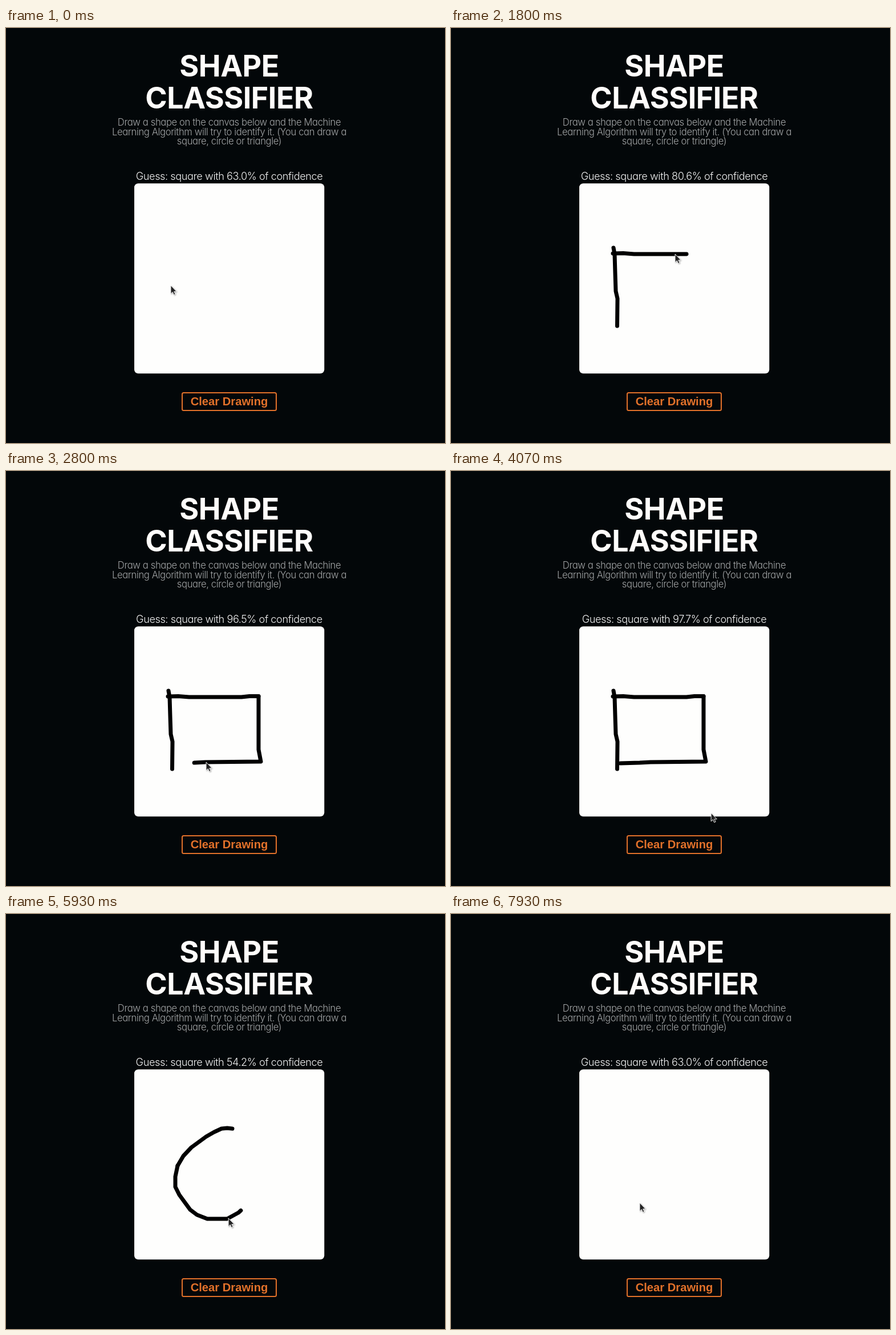
An HTML page that plays this animation: 770x727 px, repeating every 8000 ms.

```html
<!DOCTYPE html>
<html lang="en">
<head>
<meta charset="utf-8">
<title>Shape Classifier</title>
<style>
  html, body { margin: 0; width: 100%; height: 100%; overflow: hidden; background: #030709; }
  svg { display: block; }
  text { text-anchor: middle; font-family: Inter, sans-serif; font-weight: 300; letter-spacing: -.025em;
         font-optical-sizing: none; font-feature-settings: "cv11"; }
  .title { font-size: 52px; font-weight: 700; letter-spacing: -.01em; fill: #fffdfb; }
  .intro { font-size: 16.7px; fill: #a4a6a7; }
  #guess { font-size: 18.2px; fill: #f4f4f4; }
  .button { font: 700 20.2px "Liberation Sans", Arial, sans-serif; letter-spacing: 0; fill: #e2712a; }
  #ink path { fill: none; stroke: #000; stroke-width: 7; stroke-linecap: round; stroke-linejoin: round; }
  #cursor { fill: #222; stroke: #fff; stroke-width: .9; filter: drop-shadow(1px 1px 1px rgba(0, 0, 0, .35)); }
</style>
</head>
<body>
<svg width="770" height="727" viewBox="0 0 770 727">
  <text class="title" x="391.5" y="84.5">SHAPE</text>
  <text class="title" x="391.5" y="141">CLASSIFIER</text>
  <text class="intro" x="391.5" y="171">Draw a shape on the canvas below and the Machine</text>
  <text class="intro" x="391.5" y="187.6">Learning Algorithm will try to identify it. (You can draw a</text>
  <text class="intro" x="391.5" y="204.2">square, circle or triangle)</text>
  <text id="guess" x="391.5" y="266"></text>
  <rect x="225" y="272.3" width="333.3" height="333" rx="7" fill="#fefefd"/>
  <rect x="309" y="639" width="165" height="31" rx="2.5" fill="none" stroke="#e2712a" stroke-width="2"/>
  <text class="button" x="391.5" y="661">Clear Drawing</text>
  <g id="ink"></g>
  <path id="cursor" d="M0 0V14.6L3.3 11.5 5.5 16.5 8 15.4 5.8 10.7H10.2Z"/>
</svg>
<script>
const LOOP = 8000, STEP = 1000 / 15;
const [ink, cursor, guess] = ['ink', 'cursor', 'guess'].map(id => document.getElementById(id));

// Pointer travel: start, end, path, and for pen strokes the time they are cleared
const moves = [
  [0, 267, 'M289 451L287 413'],
  [340, 530, 'M287 413L285 385'],
  [530, 1070, 'M285 385L287 396 288 430 289 461 292 474 291.5 522', 4600],
  [1190, 1370, 'M291.5 522L284 395'],
  [1370, 1900, 'M284 395L302 394.5 321 396 413 396 427 394.5 443 394.5', 4600],
  [2060, 2906, 'M443 394.5V488L447 509 350 510 331 511 297 512', 4600],
  [2930, 3060, 'M297 512L293 510'],
  [3330, 3860, 'M293 510L286 507Q510 540 480 580Q472 594 456 599'],
  [3990, 4060, 'M456 599L457 600'],
  [4130, 4330, 'M457 600Q410 655 383 645'],
  [4600, 5000, 'M383 645L397 376'],
  [5267, 5400, 'M397 376L388 375 378 376 365 382 351 390 325 409 311 424 301 441', 7460],
  [5460, 6400, 'M301 441L297 460V478L304 492 323 518 335 527 353 534H388L408 523 423 509' +
    ' 433 491V436L426 412 409 386 396 375 390 372 381 369', 7460],
  [6400, 6465, 'M381 369L372 374'],
  [6470, 6935, 'M372 374L439 577'],
  [7000, 7065, 'M439 577L448 628'],
  [7190, 7400, 'M448 628L440 651'],
  [7500, 7860, 'M440 651L331 506'],
].map(([start, end, d, cleared]) => {
  const path = document.createElementNS('http://www.w3.org/2000/svg', 'path');
  path.setAttribute('d', d);
  if (cleared) ink.append(path);
  return { start, end, path, cleared, length: path.getTotalLength() };
});

const guesses = [
  [0, 'square', '63.0'], [660, 'square', '60.8'], [860, 'square', '64.7'], [1060, 'square', '68.2'],
  [1530, 'square', '76.4'], [1730, 'square', '80.6'], [1930, 'square', '85.9'],
  [2260, 'square', '90.3'], [2530, 'square', '94.8'], [2730, 'square', '96.5'], [2930, 'square', '97.7'],
  [4600, 'square', '63.0'], [5330, 'square', '57.8'], [5860, 'square', '54.2'], [6060, 'square', '51.6'],
  [6260, 'circle', '62.4'], [6460, 'circle', '70.3'], [7460, 'square', '63.0'],
];

const progress = (move, t) => Math.min(1, Math.max(0, (t - move.start) / (move.end - move.start)));

function draw(t) {
  for (const move of moves) {
    if (!move.cleared) continue;
    const drawn = move.length * progress(move, t);
    move.path.style.display = drawn > 0 && t < move.cleared ? '' : 'none';
    move.path.style.strokeDasharray = `${drawn} 9999`;
  }
  // The visible pointer trails the pen by one step
  const seen = t - STEP;
  const move = moves.findLast(m => m.start <= seen) || moves[0];
  const { x, y } = move.path.getPointAtLength(move.length * progress(move, seen));
  cursor.setAttribute('transform', `translate(${x} ${y})`);

  const [, shape, percent] = guesses.findLast(g => g[0] <= t);
  guess.textContent = `Guess: ${shape} with ${percent}% of confidence`;
}

function frame() {
  draw(Math.floor((performance.now() % LOOP + 5) / STEP) * STEP % LOOP);
  requestAnimationFrame(frame);
}
frame();
</script>
</body>
</html>
```
